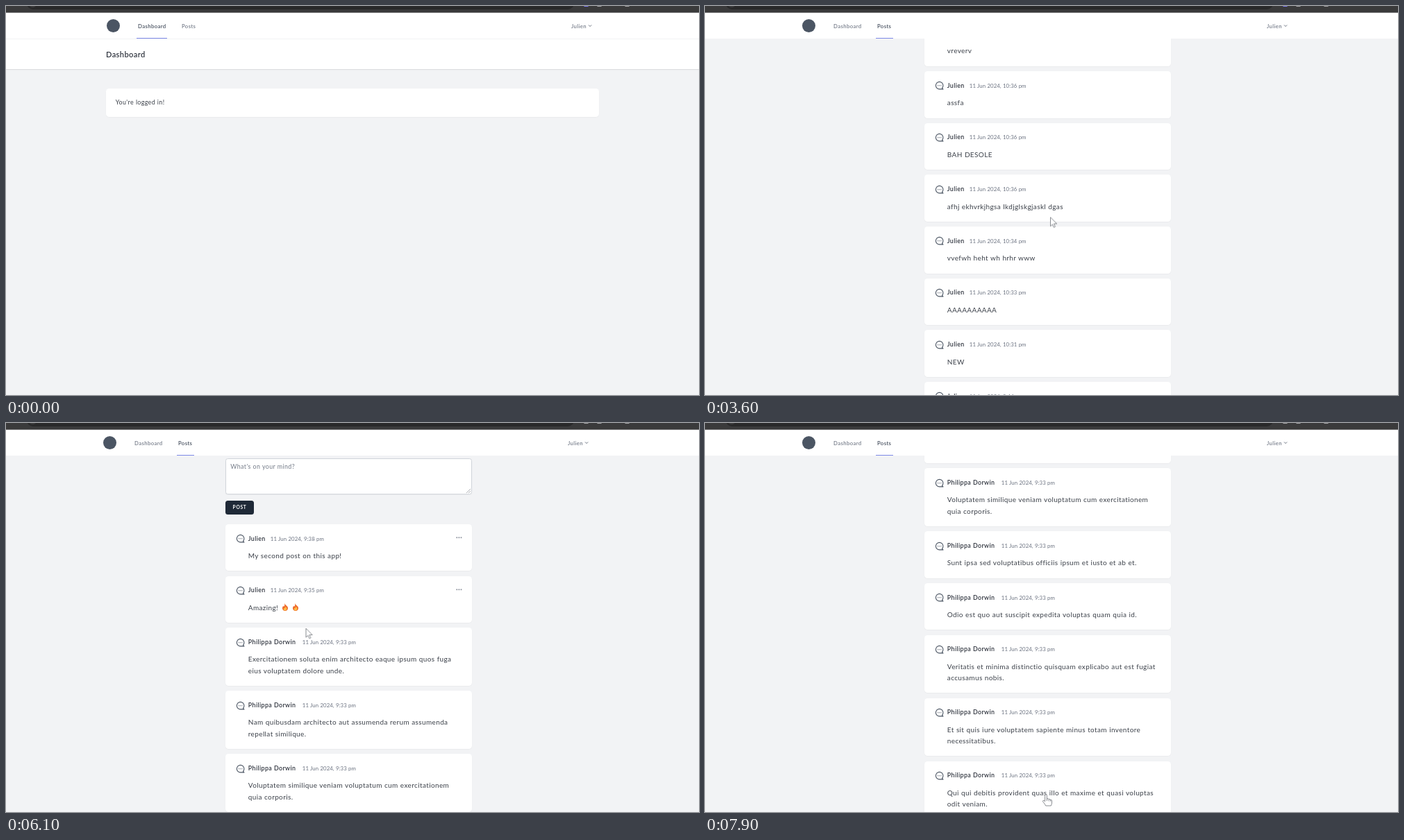
These frames come from a looping animation (998x561 px, 8000 ms). An HTML page:

```html
<!DOCTYPE html>
<html lang="en">
<head>
<meta charset="utf-8">
<title>Posts</title>
<style>
html, body { margin: 0; width: 100%; height: 100%; overflow: hidden; }
#stage {
  position: relative; width: 998px; height: 561px; overflow: hidden;
  background: #f2f3f5; color: #3b4049;
  font: 8.87px/12px Lato, "Open Sans", sans-serif;
  letter-spacing: .042em; word-spacing: .03em; white-space: nowrap;
}
#stage div, #stage b, #stage i, .abs { position: absolute; }
#stage i { font-style: normal; }
#stage b { font-weight: 600; color: #30353f; }
.scene, .page { left: 0; top: 0; width: 998px; height: 561px; }

/* browser edge */
.chrome { left: 0; top: 0; width: 998px; height: 9px; background: #3a3a3b; border-bottom: 1px solid #7d7d7e; overflow: hidden; }
.bar { left: 30px; top: -14px; width: 788px; height: 19px; border-radius: 9px; background: #29292a; }
.knob { left: 33px; top: -9px; width: 11px; height: 11px; border-radius: 50%; background: #3d3d3e; }
.dab { top: -2px; width: 7px; height: 3px; border-radius: 2px; background: #a3a3a5; }
.tint { left: 832px; animation: tint 8s step-end infinite; }

/* navigation */
.nav { left: 0; top: 9.5px; width: 998px; height: 37.5px; background: #fff; }
.nav i { top: 13px; font-size: 7.77px; font-weight: 500; color: #6b7280; }
.nav .on { color: #374151; }
.mark { left: 145px; top: 9px; width: 19px; height: 19px; border-radius: 50%; background: #4b5563; }
.line { top: 36px; height: 1.5px; background: #7c88e6; }
.items { left: 0; top: 0; width: 998px; height: 37px; }
.posts .items { left: -5px; }

/* dashboard */
.dash { animation: dash 8s step-end infinite; }
.head { left: 0; top: 47.5px; width: 998px; height: 43px; background: #fff; box-shadow: 0 .6px 1.6px rgba(0,0,0,.2); }
.head b { left: 144px; top: 14px; font-size: 11.1px; line-height: 15px; }
.panel { left: 144px; top: 118.5px; width: 709.5px; height: 41.5px; }
.panel, .card { background: #fff; border-radius: 4.5px; box-shadow: 0 .6px 1.2px rgba(0,0,0,.06); }

/* posts */
.posts { animation: posts 8s step-end infinite; }
.one { animation: one 8s step-end infinite; }
.two { animation: two 8s step-end infinite; }
.one .roll { animation: roll1 8s step-end infinite; }
.two .roll { animation: roll2 8s step-end infinite; }
.roll { left: 316.3px; top: 0; width: 354.9px; }
.field {
  left: 0; top: 67px; width: 100%; height: 52px; box-sizing: border-box; background: #fff;
  border: .8px solid #d1d5db; border-radius: 3.5px; box-shadow: 0 .6px 1.2px rgba(0,0,0,.06);
}
.field i { left: 6px; top: 4.6px; color: #737a87; }
.field svg { right: 1px; bottom: 1px; }
.btn {
  left: 0; top: 128.4px; width: 40.4px; height: 19.6px; border-radius: 3.5px; background: #1f2937; color: #fff;
  font-size: 6.65px; font-weight: 700; line-height: 19.6px; letter-spacing: .1em; text-align: center;
}
#stage .list { left: 0; top: 162px; width: 100%; }
#stage .card { position: relative; margin-bottom: 7.2px; padding: 37.15px 0 14.05px 32.5px; }
.body { display: block; font-size: 10px; line-height: 16.3px; white-space: pre-line; }
.card b { left: 32.5px; top: 14.6px; }
.card i { top: 14.6px; font-size: 7.77px; letter-spacing: .01em; color: #6b7280; }
.chat { left: 14.4px; top: 14.3px; }
.more { left: 332px; top: 18.4px; }
.flame { margin-left: 5px; vertical-align: -1.2px; }
#stage .foot { position: relative; height: 70px; margin-top: 14.2px; }
.foot i { left: 0; top: 5px; font-size: 7.77px; color: #8c95a6; }
.pager { left: 120px; top: 0; width: 234.9px; height: 22.5px; border-radius: 3.5px; background: #1f2937; display: flex; }
.pager span {
  flex: 1 0 0; text-align: center; color: #d6dae1; font-size: 7.77px; font-weight: 600;
  line-height: 22.5px; letter-spacing: 0; border-left: .7px solid #46505f;
}
.pager span:first-child { border: 0; }
.pager span.off { color: #7d8694; font-weight: 400; }
.top { left: 0; width: 100%; top: 37px; text-align: center; }

.tip {
  left: 0; top: 548px; width: 8px; height: 13px; border-radius: 0 3px 0 0; background: #232425; color: #e4e4e4;
  font-size: 7px; line-height: 14px; letter-spacing: 0; animation: tip 8s step-end infinite;
}

/* pointer */
.pointer { left: 0; top: 0; animation: move 8s step-end infinite; }
.pointer svg { overflow: visible; fill: #fff; stroke: #7c7f85; stroke-width: .9; stroke-linejoin: round; stroke-linecap: round; }
.arrow { animation: arrow 8s step-end infinite; }
.hand { animation: hand 8s step-end infinite; }

@keyframes tint { 0% { background: #7d7cf2; } 52.5%, 100% { background: #a3a3a5; } }
@keyframes dash { 0% { visibility: visible; } 17.5%, 100% { visibility: hidden; } }
@keyframes posts { 0% { visibility: hidden; } 17.5%, 100% { visibility: visible; } }
@keyframes one { 0% { visibility: hidden; } 17.5% { visibility: visible; } 61.25%, 100% { visibility: hidden; } }
@keyframes two { 0% { visibility: hidden; } 61.25%, 100% { visibility: visible; } }
@keyframes tip { 0% { visibility: hidden; } 12.5% { visibility: visible; } 23.75%, 100% { visibility: hidden; } }
@keyframes arrow {
  0% { visibility: hidden; } 1.25% { visibility: visible; } 12.5% { visibility: hidden; }
  25% { visibility: visible; } 55% { visibility: hidden; } 62.5% { visibility: visible; }
  92.5%, 100% { visibility: hidden; }
}
@keyframes hand {
  0% { visibility: hidden; } 12.5% { visibility: visible; } 25% { visibility: hidden; }
  55% { visibility: visible; } 62.5% { visibility: hidden; } 92.5%, 100% { visibility: visible; }
}
@keyframes roll1 {
  0%, 37.5% { transform: translateY(0); }
  37.5% { animation-timing-function: steps(6); }
  45% { transform: translateY(-292px); animation-timing-function: steps(3); }
  48.75%, 100% { transform: translateY(-424px); }
}
@keyframes roll2 {
  0%, 75% { transform: translateY(0); }
  76.25% { transform: translateY(-16px); animation-timing-function: steps(6); }
  83.75% { transform: translateY(-378px); animation-timing-function: steps(2); }
  86.25%, 95% { transform: translateY(-522px); }
  96.25% { transform: translateY(-514px); }
  97.5% { transform: translateY(-482px); }
  98.75%, 100% { transform: translateY(-428px); }
}
@keyframes move {
  0% { transform: translate(470px, 524px); }
  1.25% { transform: translate(470px, 524px); animation-timing-function: steps(2); }
  3.75% { transform: translate(430px, 430px); animation-timing-function: steps(4); }
  8.75% { transform: translate(290px, 110px); animation-timing-function: steps(3); }
  12.5% { transform: translate(263px, 32px); }
  13.75%, 23.75% { transform: translate(263px, 31px); }
  23.75% { animation-timing-function: steps(2); }
  26.25% { transform: translate(290px, 78px); animation-timing-function: steps(4); }
  31.25% { transform: translate(415px, 250px); animation-timing-function: steps(2); }
  33.75% { transform: translate(442px, 292px); animation-timing-function: steps(5); }
  40% { transform: translate(496px, 303px); }
  45%, 48.75% { transform: translate(497px, 304.5px); }
  48.75% { animation-timing-function: steps(4); }
  53.75% { transform: translate(640px, 490px); animation-timing-function: steps(2); }
  56.25%, 61.25% { transform: translate(660px, 514px); }
  61.25% { animation-timing-function: steps(5); }
  67.5% { transform: translate(491px, 383px); animation-timing-function: steps(3); }
  71.25% { transform: translate(424px, 312px); animation-timing-function: steps(2); }
  73.75%, 76.25% { transform: translate(431.5px, 296px); }
  76.25% { animation-timing-function: steps(6); }
  83.75%, 86.25% { transform: translate(459px, 441px); }
  86.25% { animation-timing-function: steps(5); }
  92.5%, 100% { transform: translate(491px, 536px); }
}
</style>
</head>
<body>
<div id="stage">
  <div class="scene dash">
    <div class="nav"></div>
    <div class="head"><b>Dashboard</b></div>
    <div class="panel"><i style="left:13.7px;top:14.6px">You're logged in!</i></div>
  </div>

  <div class="page one"><div class="roll"></div></div>
  <div class="page two"><div class="roll"></div></div>

  <div class="scene posts"><div class="nav"></div></div>

  <div class="chrome">
    <div class="bar"></div><div class="knob"></div>
    <div class="dab tint"></div>
    <div class="dab" style="left:851px"></div>
    <div class="dab" style="left:891px"></div>
  </div>
  <div class="tip">ts</div>

  <div class="pointer">
    <svg class="abs arrow" width="12" height="18"><path d="M.5 .5v12.6l2.9-2.7 2 4.4 2-.9-2-4.3h3.9z"/></svg>
    <svg class="abs hand" width="14" height="18"><path d="M-1.4 9.2V1.2Q-1.4-.3 0-.3T1.4 1.2V6Q3.9 5 4.2 6.7 6.2 5.9 6.6 7.4 8.5 7.1 8.5 9V12Q8.5 13.6 7.2 16H-.4Q-1.2 13.8-4.2 10.3-5 9-4 8.4-3 7.9-1.4 9.8M1.4 6V8.6M4.2 6.8V9M6.6 7.4V9.3"/></svg>
  </div>
</div>

<script>
const ME = 'Julien', GUEST = 'Philippa Dorwin';
const $ = sel => document.querySelector(sel);

const chat = `<svg class="abs chat" width="13.3" height="13.3" viewBox="0 0 24 24" fill="none" stroke="#4b5563" stroke-width="2" stroke-linecap="round" stroke-linejoin="round"><path d="M8 12h.01M12 12h.01M16 12h.01M21.5 12A9.5 9.5 0 1 0 12 21.5H21.5L18.8 18.6A9.5 9.5 0 0 0 21.5 12z"/></svg>`;
const more = `<svg class="abs more" width="9" height="3" fill="#8b919c"><circle cx="1.3" cy="1.2" r="1"/><circle cx="4.4" cy="1.2" r="1"/><circle cx="7.5" cy="1.2" r="1"/></svg>`;
const flame = `<svg class="flame" width="10" height="11" viewBox="0 0 10 11"><path d="M4.4 0Q5 2.2 7 3.5 9.4 5.2 9 7.6 8.4 11 5 11T1 7.6Q.8 5.4 2.2 3.8L3 5Q4.8 2.8 4.4 0z" fill="#ee6a2c"/><path d="M5.2 4.6Q7.6 6.6 7.2 8.6 6.8 10.6 5 10.6T2.8 8.7Q2.7 7.4 3.6 6.6L4.2 7.4Q5.3 6.2 5.2 4.6z" fill="#fdbf45"/></svg>`;
const chevron = `<svg class="abs" style="left:838px;top:16px" width="7" height="6"><path d="M1 1.4l2.1 2.1 2.1-2.1" fill="none" stroke="#6b7280" stroke-width="1"/></svg>`;

const nav = (scene, active, x, width) => {
  const link = (name, left) => `<i class="${name === active ? 'on' : ''}" style="left:${left}px">${name}</i>`;
  $(`.${scene} .nav`).innerHTML = `<div class="items"><div class="mark"></div>
    ${link('Dashboard', 190)}${link('Posts', 253)}${link(ME, 814)}${chevron}
    <div class="line" style="left:${x}px;width:${width}px"></div></div>`;
};

const card = (who, time, text, menu) => `<div class="card">${chat}<b>${who}</b>
  <i style="left:${who === ME ? 64.5 : 110.5}px">11 Jun 2024, ${time} pm</i>${menu ? more : ''}<span class="body">${text}</span></div>`;

const foot = (now, range) => {
  const cell = (label, off) => `<span${off ? ' class="off"' : ''}>${label}</span>`;
  const pages = [1, 2, 3, 4, 5, 6, 7, 8].map(n => cell(n, n === now)).join('');
  return `<div class="foot"><i>Showing ${range} of 72 results</i>
    <div class="pager">${cell('‹', now === 1)}${pages}${cell('›')}</div><div class="top">Scroll to Top</div></div>`;
};

const fill = (page, cards, footer) => {
  $(`.${page} .roll`).innerHTML = `<div class="field"><i>What's on your mind?</i>
    <svg class="abs" width="6" height="6"><path d="M0 6L6 0M3 6L6 3" stroke="#8b8f96" stroke-width=".7"/></svg></div>
    <div class="btn">POST</div><div class="list">${cards.join('')}${footer}</div>`;
};

nav('dash', 'Dashboard', 188, 44);
nav('posts', 'Posts', 251, 25);

fill('one', [
  ['10:37', 'amazing'],
  ['10:37', 'vvvvvvvvvv'],
  ['10:36', 'vreverv'],
  ['10:36', 'assfa'],
  ['10:36', 'BAH DESOLE'],
  ['10:36', 'afhj ekhvrkjhgsa lkdjglskgjaskl dgas'],
  ['10:34', 'vvefwh heht wh hrhr www'],
  ['10:33', 'AAAAAAAAAA'],
  ['10:31', 'NEW'],
  ['9:44', 'Amazing stuff right?']
].map(([time, text]) => card(ME, time, text)), foot(1, '1 to 10'));

fill('two', [
  card(ME, '9:38', 'My second post on this app!', true),
  card(ME, '9:35', 'Amazing!' + flame + flame, true),
  ...[
    'Exercitationem soluta enim architecto eaque ipsum quos fuga\neius voluptatem dolore unde.',
    'Nam quibusdam architecto aut assumenda rerum assumenda\nrepellat similique.',
    'Voluptatem similique veniam voluptatum cum exercitationem\nquia corporis.',
    'Sunt ipsa sed voluptatibus officiis ipsum et iusto et ab et.',
    'Odio est quo aut suscipit expedita voluptas quam quia id.',
    'Veritatis et minima distinctio quisquam explicabo aut est fugiat\naccusamus nobis.',
    'Et sit quis iure voluptatem sapiente minus totam inventore\nnecessitatibus.',
    'Qui qui debitis provident quas illo et maxime et quasi voluptas\nodit veniam.'
  ].map(text => card(GUEST, '9:33', text))
], foot(2, '11 to 20'));
</script>
</body>
</html>
```
